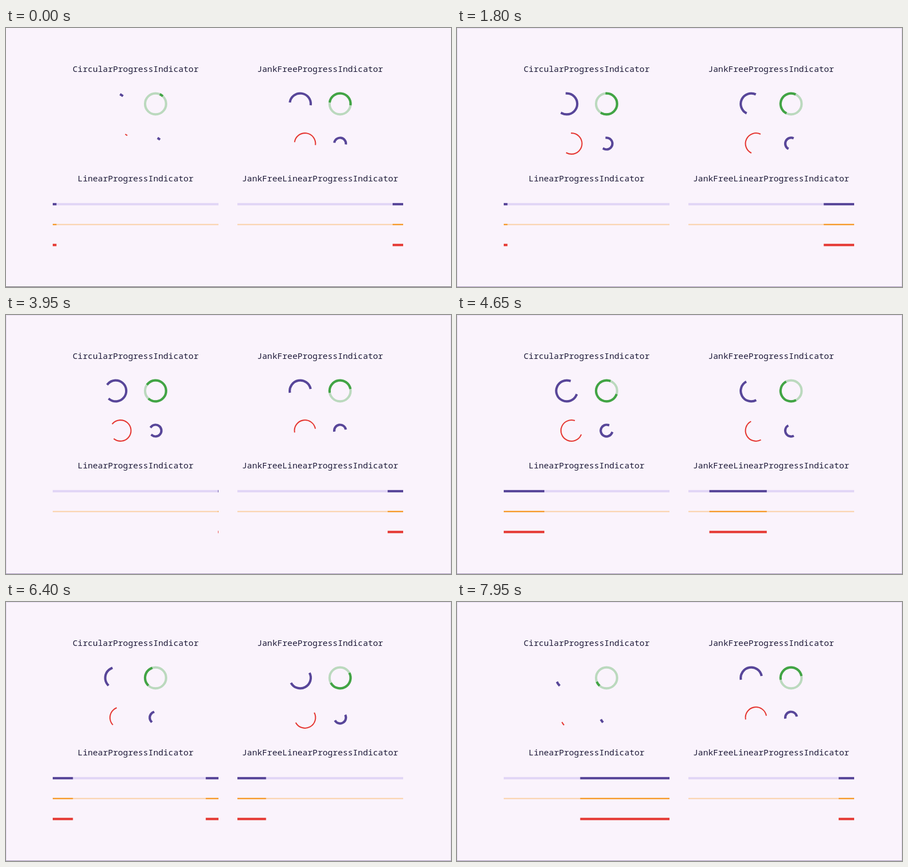
Recreate the animation shown at these times as an HTML page. Size 800 px wide and 466 px high, loop 8 s.

```html
<!DOCTYPE html>
<html lang="en">
<head>
<meta charset="utf-8">
<title>Progress indicators</title>
<style>
  html, body { margin: 0; width: 100%; height: 100%; overflow: hidden; background: #faf3fc; }
  svg { display: block; width: 100%; height: 100%; }
  text { font: 15.1px "Noto Sans Mono", "DejaVu Sans Mono", monospace; fill: #1d1a38; text-anchor: middle; }
  circle { fill: none; }
</style>
</head>
<body>
<svg id="stage" viewBox="0 0 800 466">
  <text x="233" y="79">CircularProgressIndicator</text>
  <text x="564.7" y="79">JankFreeProgressIndicator</text>
  <text x="233" y="276">LinearProgressIndicator</text>
  <text x="564.7" y="276">JankFreeLinearProgressIndicator</text>
  <path id="bottomEdge" d="M0 465.5H800"/>
  <path id="sideEdges" d="M.5 465V.5H799.5V465" fill="none" stroke="#e3d9ee"/>
</svg>
<script>
const LOOP = 8000;
const PURPLE = '#584699', GREEN = '#42a445', RED = '#e53833', ORANGE = '#f5931a';
const BAR_WIDTH = 298;
const stage = document.getElementById('stage');
const bottomEdge = document.getElementById('bottomEdge');
const sideEdges = document.getElementById('sideEdges');

const mod = (a, b) => ((a % b) + b) % b;
const clamp = v => Math.min(1, Math.max(0, v));

function add(tag, attrs) {
  const node = document.createElementNS('http://www.w3.org/2000/svg', tag);
  set(node, attrs);
  stage.append(node);
  return node;
}

function set(node, attrs) {
  for (const name in attrs) node.setAttribute(name, attrs[name]);
}

// Cubic easing from (0,0) to (1,1) with control points (x1,0) and (x2,1).
function ease(x1, x2) {
  return x => {
    if (x <= 0 || x >= 1) return clamp(x);
    let lo = 0, hi = 1;
    for (let i = 0; i < 24; i++) {
      const s = (lo + hi) / 2, r = 1 - s;
      if (3 * x1 * s * r * r + 3 * x2 * s * s * r + s * s * s < x) lo = s; else hi = s;
    }
    return lo * lo * (3 - 2 * lo);
  };
}

function makeSpinners(dx, cap) {
  const arc = (cx, cy, r, width, color, track) => {
    const ring = { cx: cx + dx, cy, r, 'stroke-width': width };
    if (track) add('circle', { ...ring, stroke: track });
    const node = add('circle', { ...ring, stroke: color, 'stroke-linecap': cap, pathLength: 360 });
    return { node, cx: cx + dx, cy };
  };
  return [
    arc(197.3, 136.5, 18.9, 4.2, PURPLE),
    arc(268.9, 136.5, 18.9, 4.2, GREEN, '#bbd9be'),
    arc(205.8, 208, 18.9, 2.1, RED),
    arc(268.9, 208, 10.5, 4.2, PURPLE)
  ];
}

function makeBars(x) {
  const bar = (y, height, color, track) => {
    const box = { y: y - height / 2, height };
    if (track) add('rect', { ...box, x, width: BAR_WIDTH, fill: track });
    return [0, 1].map(() => add('rect', { ...box, fill: color }));
  };
  return {
    x,
    rows: [
      bar(317, 4.2, PURPLE, '#e1d6f6'),
      bar(353.6, 2.1, ORANGE, '#fad2a8'),
      bar(390.4, 4.2, RED)
    ]
  };
}

// Angles are in degrees, clockwise from the top.
function drawSpinners(spinners, start, sweep) {
  for (const { node, cx, cy } of spinners) {
    set(node, {
      'stroke-dasharray': `${Math.max(sweep, 0.1)} 360`,
      transform: `rotate(${start - 90} ${cx} ${cy})`
    });
  }
}

function drawBars({ x, rows }, segments) {
  for (const row of rows) {
    row.forEach((rect, i) => {
      const [tail, head] = (segments[i] || [0, 0]).map(clamp);
      set(rect, { x: x + tail * BAR_WIDTH, width: Math.max(0, head - tail) * BAR_WIDTH });
    });
  }
}

const sweepEase = ease(0.4, 0.2);
const head1 = ease(0.2, 0.8), tail1 = ease(0.4, 1);
const head2 = ease(0, 0.65), tail2 = ease(0.1, 0.45);

// The ordinary indicators stall for half a second at regular intervals.
function jankyTime(t) {
  const sinceStall = mod(t - 549, 1489);
  return sinceStall < 500 ? t - sinceStall : t;
}

const leftSpinners = makeSpinners(0, 'square');
const rightSpinners = makeSpinners(331.7, 'butt');
const leftBars = makeBars(84);
const rightBars = makeBars(416);

function drawJanky(t) {
  const path = mod(t + 1194, 1333) / 1333;
  const turn = mod(t + 286, 2222) / 2222;
  const head = sweepEase(path * 2), tail = sweepEase(path * 2 - 1);
  drawSpinners(leftSpinners, tail * 270 + turn * 360 + path * 90, (head - tail) * 270);

  const p = mod(t + 46, 1800);
  drawBars(leftBars, [
    [tail1((p - 333) / 750), head1(p / 750)],
    [tail2((p - 1267) / 533), head2((p - 1000) / 567)]
  ]);
}

function drawSmooth(t) {
  drawSpinners(rightSpinners, 277.5 + t * 0.36, 180);
  const p = mod(t - 107, 2000) / 1000;
  drawBars(rightBars, [[-0.2 + 0.6 * p, -0.18 + 1.2 * p]]);
}

function frame(now) {
  const t = now % LOOP;
  drawJanky(jankyTime(t));
  drawSmooth(t);
  const active = t >= 1300;
  set(sideEdges, { visibility: active ? 'visible' : 'hidden' });
  set(bottomEdge, { stroke: active ? '#a596b8' : '#6f6b73' });
  requestAnimationFrame(frame);
}
frame(performance.now());
</script>
</body>
</html>
```
